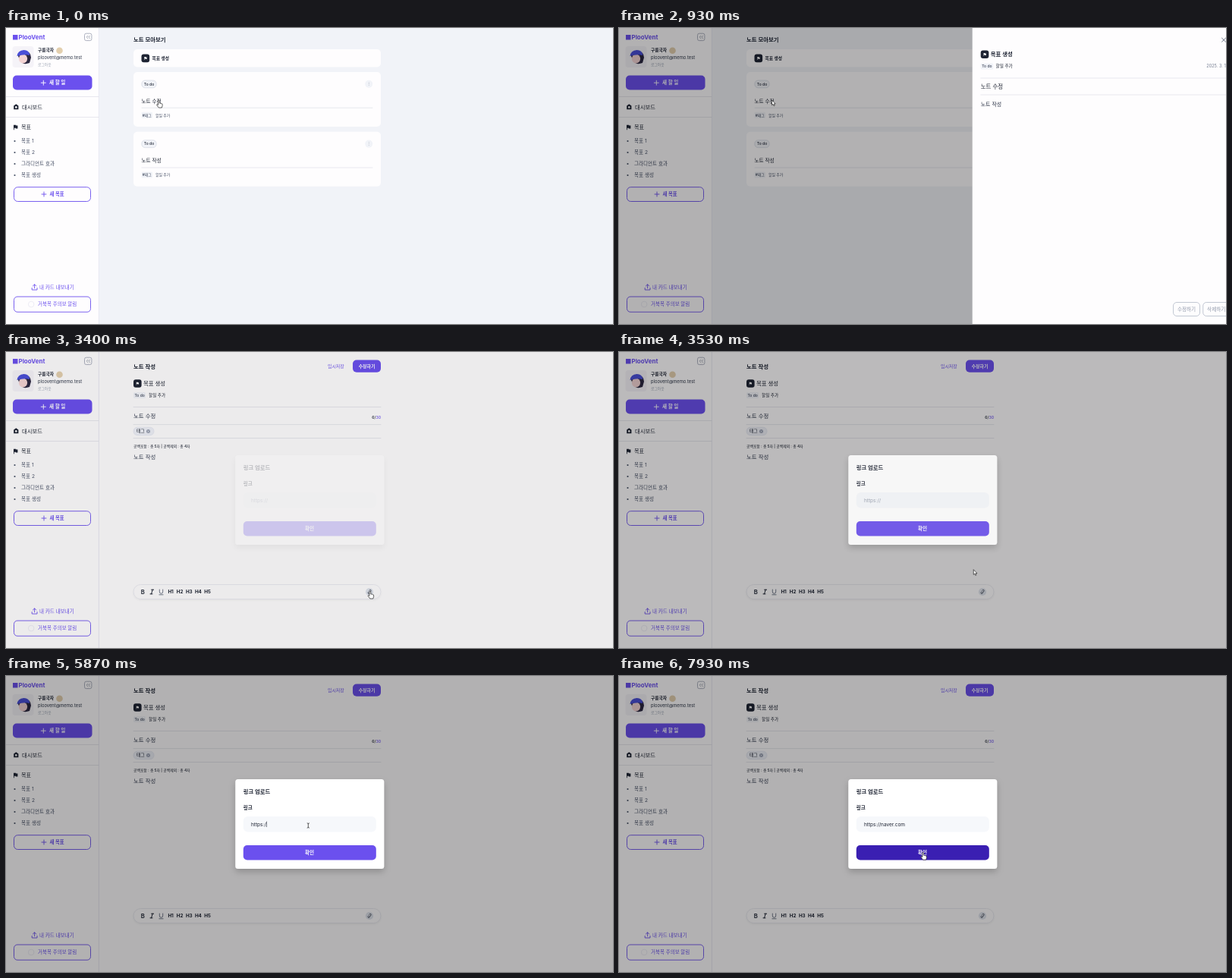
Write an HTML page that moves like this. It is 800 px wide and 390 px high and loops after 8000 ms.

```html
<!DOCTYPE html>
<html lang="ko">
<head>
<meta charset="utf-8">
<style>
  html, body { margin: 0; width: 100%; height: 100%; overflow: hidden; background: #fefdfe; }
  svg { display: block; font-family: Inter, 'Noto Sans CJK KR', 'Noto Sans CJK', sans-serif; }
</style>
</head>
<body>
<svg id="stage" width="800" height="390" viewBox="0 0 800 390"></svg>
<script>
const LOOP = 8000, EDIT_AT = 1970, DRAWER_AT = 495, MODAL_AT = 3353, TYPE_AT = 5000, KEY_MS = 138;
const URL_TEXT = 'https://naver.com';
const PURPLE = '#6b50ee', INK = '#1e2433', SLATE = '#475066', MUTED = '#8f98aa', PALE = '#f1f3f8', RULE = '#e1e2ea', WHITE = '#fefdfe';

// Text is placed by its vertical centre.
const text = (x, cy, str, size, weight = 400, fill = INK, extra = '') =>
  `<text x="${x}" y="${cy + size * 0.36}" font-size="${size}" font-weight="${weight}" fill="${fill}" ${extra}>${str}</text>`;
const mid = (x, cy, str, size, weight, fill) => text(x, cy, str, size, weight, fill, 'text-anchor="middle"');
const rect = (x, y, w, h, r, fill, extra = '') =>
  `<rect x="${x}" y="${y}" width="${w}" height="${h}" rx="${r}" fill="${fill}" ${extra}/>`;
const circle = (x, y, r, fill, extra = '') => `<circle cx="${x}" cy="${y}" r="${r}" fill="${fill}" ${extra}/>`;
const stroke = (d, color, width = 1, extra = '') =>
  `<path d="${d}" fill="none" stroke="${color}" stroke-width="${width}" stroke-linecap="round" stroke-linejoin="round" ${extra}/>`;
const rule = (x1, x2, y, color = RULE) => stroke(`M${x1} ${y}H${x2}`, color, 0.8);
const outlined = (x, y, w, h, r, color) => rect(x, y, w, h, r, WHITE, `stroke="${color}" stroke-width=".9"`);
const plus = (x, y, color) => stroke(`M${x - 3} ${y}h6M${x} ${y - 3}v6`, color, 0.9);
const flag = (x, y, s, color) =>
  `<path transform="translate(${x} ${y}) scale(${s})" fill="${color}" d="M-2.5-3h3l.4.8h2v4h-2.5l-.4-.8h-1.7V3.4h-.8z"/>`;
const goalIcon = (x, y) => rect(x, y, 10.6, 10.6, 3, INK) + flag(x + 5.3, y + 5.3, 0.6, '#fff');

function sidebar() {
  const goals = ['목표 1', '목표 2', '그라디언트 효과', '목표 생성'];
  return rect(0, 0, 122, 390, 0, WHITE) + stroke('M122.4 0V390', '#e4e4ee', 0.8)
    + rect(9, 9, 6.5, 6.5, 0, PURPLE) + text(16.5, 12.6, 'PlooVent', 8, 700, PURPLE)
    + outlined(103.5, 7.2, 9.4, 9.4, 2.2, '#a4a9b8')
    + stroke('M108 10.2l-1.8 1.8 1.8 1.8M110.6 10.2l-1.8 1.8 1.8 1.8', '#6f778a', 0.6)
    + rect(8.5, 24, 28, 28, 4, '#f5f3f8')
    + `<path d="M16 37q0-7 8-7q9 1 9 9l-2 7q-8 3-12-2z" fill="#2b2740"/>`
    + `<ellipse cx="22.5" cy="40.5" rx="5.6" ry="6" fill="#f3d3d3"/>`
    + `<path d="M14.5 37q1-7.500 9-8q7 0 8 7q-8-2-17 1z" fill="#4a4fd8"/>`
    + text(42, 29.3, '구름국자', 5.7, 600) + circle(70.5, 29.7, 4.3, '#e3cfae')
    + text(42, 38.8, 'ploovent@memo.test', 5.8, 400, '#2c3446')
    + text(42, 48, '로그아웃', 4.8, 400, '#9aa2b2')
    + rect(9, 62.5, 104.500, 19, 5, PURPLE) + plus(49.3, 72.2, '#fff') + text(57, 72, '새 할 일', 6.6, 700, '#fff')
    + rule(0, 122, 90.500) + rule(0, 122, 117.500)
    + `<path d="M10.200 102.600L13.300 100.300L16.400 102.600V107.300H10.200z" fill="${INK}"/>` + circle(13.3, 104.4, 1.3, WHITE)
    + text(21, 104, '대시보드', 7.3, 500)
    + flag(12.500, 130.800, 1, INK) + text(20, 130.6, '목표', 7.1, 500)
    + goals.map((g, i) => circle(11.5, 149 + i * 15, 1.1, SLATE) + text(20, 148.8 + i * 15, g, 6.55, 400, SLATE)).join('')
    + outlined(10.500, 209.700, 101, 18.800, 5, PURPLE) + plus(50, 219, PURPLE) + text(57.500, 218.800, '새 목표', 6.4, 600, PURPLE)
    + stroke('M34.200 342.500v2.500h6.800v-2.500M37.600 342.800v-4.800M35.400 340l2.200-2.200 2.200 2.200', PURPLE, 0.9)
    + text(44, 341.3, '내 카드 내보내기', 6.55, 500, PURPLE)
    + outlined(10.500, 354, 101, 20.200, 4.500, PURPLE) + circle(33.2, 364, 3.8, WHITE, 'stroke="#e9e7f3" stroke-width=".8"')
    + text(42, 363.8, '거북목 주의보 알림', 6.5, 500, PURPLE);
}

function noteCard(y, title) {
  return rect(168, y, 326, 72, 5, WHITE)
    + rect(178.800, y + 11, 19.400, 9.800, 4.500, PALE, 'stroke="#cfd4e0" stroke-width=".6"') + mid(188.5, y + 15.8, 'To do', 5, 500, INK)
    + circle(478.2, y + 15.8, 5, PALE) + [-1.8, 0, 1.8].map(d => circle(478.2, y + 15.8 + d, 0.45, MUTED)).join('')
    + text(178.5, y + 38.2, title, 6.65, 500)
    + rule(179, 483, y + 47.200)
    + rect(178.500, y + 52.800, 14.500, 8, 1.500, PALE) + text(179.8, y + 56.8, '#태그', 4.8, 500, '#3a4256')
    + text(197, y + 56.8, '할일 추가', 4.9, 400, SLATE);
}

const notesPage = () => rect(122.8, 0, 678, 390, 0, PALE)
  + text(168, 15.3, '노트 모아보기', 7.4, 600)
  + rect(168, 28, 326, 23.500, 5, WHITE) + goalIcon(178.500, 34.600) + text(192.5, 39.8, '목표 생성', 5.7, 600)
  + noteCard(58, '노트 수정') + noteCard(136.800, '노트 작성');

function editPage() {
  return rect(122.8, 0, 678, 390, 0, WHITE)
    + text(168, 19, '노트 작성', 7.4, 600) + text(424, 18.8, '임시저장', 5.9, 500, PURPLE)
    + rect(457, 10.500, 37, 16.200, 5, PURPLE) + mid(475.5, 18.7, '수정하기', 5.9, 700, '#fff')
    + goalIcon(168, 36.200) + text(181, 41.5, '목표 생성', 7.4, 500)
    + rect(168, 53, 16, 8, 1.500, PALE) + text(169.5, 57, 'To do', 5, 500, '#3a4256') + text(188, 57, '할일 추가', 5.6)
    + rule(168, 494, 72.500) + text(168, 84, '노트 수정', 7.4, 400, '#2f374a')
    + text(494, 86, `6/<tspan fill="${PURPLE}">30</tspan>`, 5.2, 500, INK, 'text-anchor="end"')
    + rule(168, 494, 95.600)
    + rect(168, 99.200, 27, 10.500, 5, '#eef0f7', 'stroke="#d9dcea" stroke-width=".5"') + text(172, 104.3, '태그', 5.8, 400)
    + circle(187.5, 104.600, 2.500, '#969db0') + stroke('M186.600 103.700l1.800 1.800m0-1.800l-1.800 1.800', '#fff', 0.5)
    + rule(168, 494, 113.500)
    + text(168, 124, '공백포함 : 총 5자 | 공백제외 : 총 4자', 4.85, 500)
    + text(168, 138, '노트 작성', 7.4, 400, '#3a4256')
    + rect(168, 306.500, 326, 19, 9.500, WHITE, 'stroke="#e7e8ef" stroke-width=".8" filter="url(#soft)"')
    + mid(180.2, 316, 'B', 7.8, 600, INK)
    + stroke('M191.600 313.200h3M190 318.800h3M193.200 313.200l-1.700 5.600', INK, 1)
    + stroke('M202.300 313v3q0 2.200 2.200 2.200t2.200-2.200v-3M201.900 319.800h5.200', SLATE, 0.75)
    + [1, 2, 3, 4, 5].map(n => mid(205 + n * 12.1, 316, 'H' + n, 6.3, 700, INK)).join('')
    + circle(479, 316, 5.1, '#dfe3ec')
    + stroke('M478.500 317.500l2-2M478.200 315.600l-1 1q-.8 1.700 1 2l1.200-1M479.800 316.400l1.300-1.200q.6-1.800-1.200-2l-1.200 1', INK, 0.6);
}

const drawer = () => rect(0, 0, 350, 390, 0, WHITE)
  + stroke('M328.800 13.200l5 5m0-5l-5 5', SLATE, 0.8)
  + goalIcon(11, 29.500) + text(24, 34.8, '목표 생성', 7.4, 600)
  + rect(11, 46.500, 16.500, 8, 1.500, PALE) + text(12.5, 50.400, 'To do', 5, 500, '#3a4256') + text(30.8, 50.400, '할일 추가', 5.6)
  + text(339, 50.400, '2025. 3. 10.', 5.6, 400, '#737c90', 'text-anchor="end"')
  + rule(11, 339, 66) + text(11, 77.200, '노트 수정', 7.45, 500) + rule(11, 339, 88)
  + text(11, 100.600, '노트 작성', 6.95, 400, '#2f374a')
  + ['수정하기', '삭제하기'].map((s, i) => outlined(264.800 + i * 39.200, 361.500, 35, 18, 4.500, '#bcc2cf')
    + mid(282.3 + i * 39.200, 370.500, s, 6.6, 400, MUTED)).join('');

const modal = () => rect(302.300, 136, 196, 118, 3.500, '#fff', 'filter="url(#lift)"')
  + text(312.8, 152.500, '링크 업로드', 7.3, 600) + text(312.8, 174, '링크', 6.5, 600)
  + rect(312.800, 185, 175, 20.500, 6, '#f6f8fb')
  + text(323, 195.200, '', 6.5, 400, INK, 'id="url"')
  + rect(0, 191.600, 0.6, 7.400, 0, INK, 'id="caret"')
  + rect(312.800, 223, 175, 19.500, 5, PURPLE, 'id="confirm"') + mid(400, 232.800, '확인', 6.6, 700, '#fff');

const OUTLINE = 'stroke="#222" stroke-width=".7" stroke-linejoin="round"';
const cursors = {
  arrow: `<path d="M0 0V6.600L1.500 5.300L2.500 7.600L3.700 7.100L2.700 4.900H4.700z" fill="#fff" ${OUTLINE}/>`,
  hand: `<path d="M-1 .7q1-1.300 1.800 0V4l1 .2q1-.4 1.400.4q1.400-.2 1.400 1.200V7.500L3.800 10H-.2L-2.800 6.600q-.2-1.400 1.200-.8L-1 6.400z" fill="#fff" ${OUTLINE}/>`,
  beam: stroke('M-1.200-3.200Q0-3.200 0-2.200V2.200Q0 3.200-1.200 3.200M1.200-3.200Q0-3.200 0-2.200M0 2.200Q0 3.200 1.200 3.200', '#222', 0.7)
};

const layer = (id, content) => `<g id="${id}">${content}</g>`;
document.getElementById('stage').innerHTML =
  `<defs><filter id="soft" x="-5%" y="-50%" width="110%" height="200%"><feDropShadow dx="0" dy="1" stdDeviation="1" flood-opacity=".06"/></filter>
   <filter id="lift" x="-10%" y="-10%" width="120%" height="125%"><feDropShadow dx="0" dy="4" stdDeviation="4" flood-opacity=".2"/></filter></defs>`
  + layer('notes', notesPage()) + layer('edit', editPage()) + sidebar()
  + rect(0, 0, 800, 390, 0, '#000', 'id="shade"') + layer('drawer', drawer()) + layer('modal', modal())
  + layer('cursor', Object.entries(cursors).map(([name, shape]) => layer(name, shape)).join(''));

const el = id => document.getElementById(id);
const show = (id, on) => el(id).setAttribute('display', on ? 'inline' : 'none');
const set = (id, name, value) => el(id).setAttribute(name, value);
const progress = (t, start, duration) => Math.min(1, Math.max(0, (t - start) / duration));
const easeIn = u => u * u, easeOut = u => 1 - (1 - u) ** 2, easeBoth = u => u * u * (3 - 2 * u);

// Pointer stops: time, x, y, easing used to get there.
const stops = [
  [0, 201.500, 95, easeBoth], [1050, 201.500, 95, easeBoth], [1700, 744, 371.500, easeBoth],
  [2700, 744, 371.500, easeBoth], [3250, 480, 315, easeBoth], [3400, 480, 315, easeBoth],
  [3530, 467.500, 287, easeIn], [4100, 398.300, 197, easeOut], [7380, 398.300, 197, easeBoth], [7780, 400.800, 232.200, easeBoth]
];

function pointerAt(t) {
  const next = stops.findIndex(s => s[0] > t);
  if (next < 0) return stops.at(-1).slice(1, 3);
  const [a, b] = [stops[next - 1], stops[next]];
  const u = b[3](progress(t, a[0], b[0] - a[0]));
  return [a[1] + (b[1] - a[1]) * u, a[2] + (b[2] - a[2]) * u];
}

function pointerKind(t, x, y) {
  if (t < DRAWER_AT + 60) return 'hand';
  if (t < EDIT_AT) return x > 714 && y > 361 ? 'hand' : 'arrow';
  if (t < 3450) return Math.hypot(x - 479, y - 316) < 6 ? 'hand' : 'arrow';
  if (x < 313 || x > 488) return 'arrow';
  if (y > 185 && y < 205.500) return 'beam';
  return y > 223 && y < 242.500 ? 'hand' : 'arrow';
}

function drawField(t) {
  const count = t < TYPE_AT ? 0 : Math.min(URL_TEXT.length, Math.floor((t - TYPE_AT) / KEY_MS) + 1);
  el('url').textContent = count ? URL_TEXT.slice(0, count) : 'https://';
  set('url', 'fill', count ? INK : '#9aa2b0');
  const focusAt = 4300, lastKey = count ? TYPE_AT + (count - 1) * KEY_MS : focusAt;
  show('caret', t >= focusAt && (t - lastKey) % 1060 < 530);
  set('caret', 'x', 323.300 + (count ? el('url').getComputedTextLength() : 0));
}

function draw(t) {
  const editing = t >= EDIT_AT;
  show('notes', !editing);
  show('edit', editing);

  const fade = editing ? progress(t, MODAL_AT, 200) : progress(t, DRAWER_AT, 200);
  set('shade', 'opacity', 0.3 * fade);
  show('drawer', !editing && t > DRAWER_AT);
  set('drawer', 'transform', `translate(${800 - 350 * easeBoth(progress(t, DRAWER_AT, 500))})`);
  show('modal', t > MODAL_AT);
  set('modal', 'opacity', fade);
  drawField(t);

  const [x, y] = pointerAt(t), kind = pointerKind(t, x, y);
  set('cursor', 'transform', `translate(${x} ${y})`);
  for (const name in cursors) show(name, name === kind);
  set('confirm', 'fill', t > 7000 && kind === 'hand' ? '#3a1fb2' : PURPLE);
}

const begin = performance.now();
function frame() {
  draw((performance.now() - begin) % LOOP);
  requestAnimationFrame(frame);
}
frame();
</script>
</body>
</html>
```
